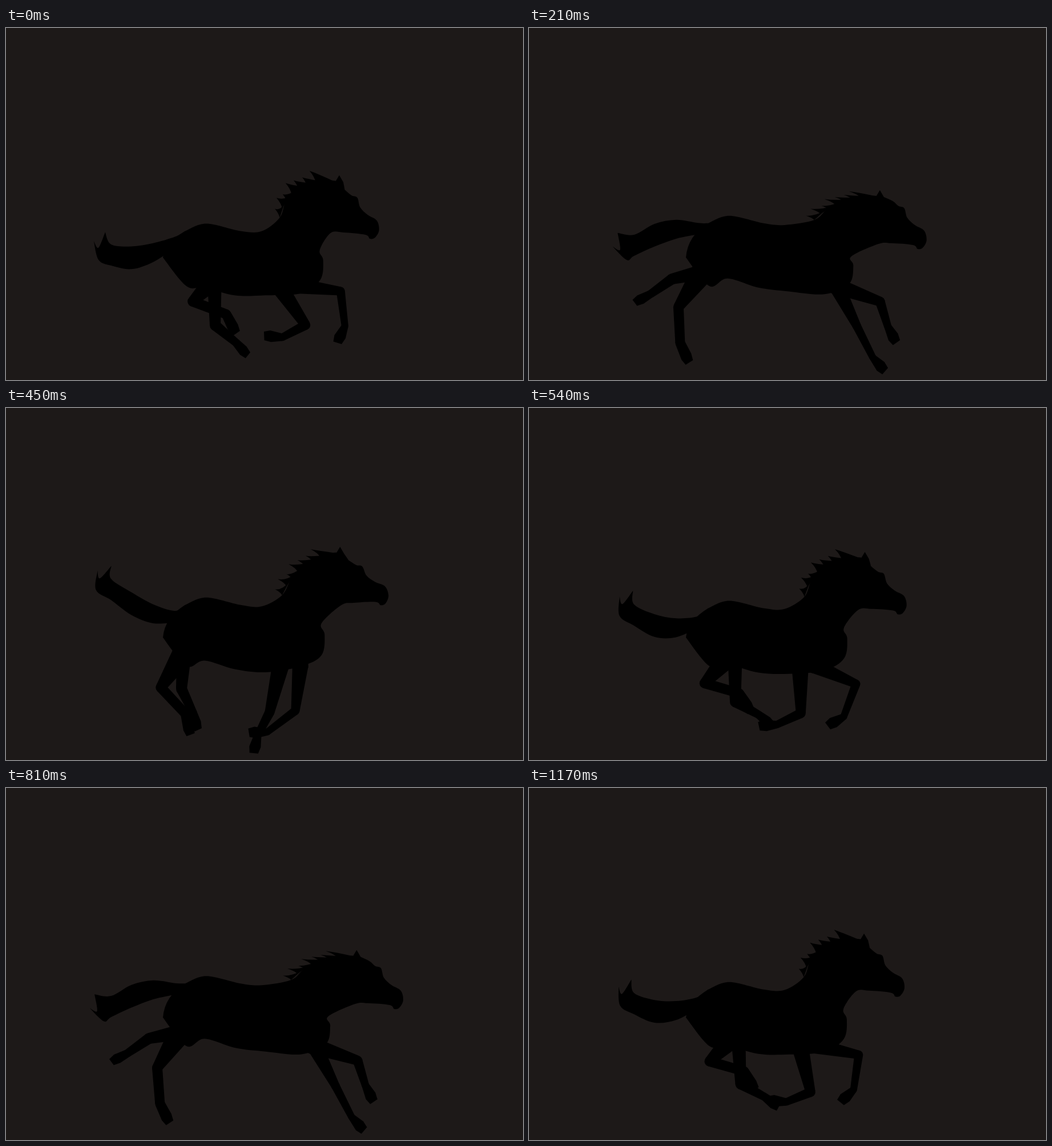
Recreate the animation shown at these times as an HTML page with a canvas. Size 906 by 618 pixels, loop 1.2 s.

```html
<!DOCTYPE html>
<html lang="en">
<head>
<meta charset="utf-8">
<title>Galloping horse</title>
<style>
  html, body { margin: 0; width: 100%; height: 100%; overflow: hidden; background: #1d1918; }
  canvas { display: block; }
</style>
</head>
<body>
<canvas id="stage" width="906" height="618"></canvas>
<script>
const ctx = document.getElementById('stage').getContext('2d');
const { sin, cos, PI, hypot } = Math;
const LOOP = 1200, STEP = 30, STRIDE = 604;

// Stride angle; every moving part is a function of it
let theta = 0;

// Mean plus first and second harmonic of the stride
const wave = (mean, c1 = 0, s1 = 0, c2 = 0, s2 = 0) => () =>
  mean + c1 * cos(theta) + s1 * sin(theta) + c2 * cos(2 * theta) + s2 * sin(2 * theta);

// A bone is a length and an angle in degrees, forward of straight down
const bone = (length, angle) => ({ length, angle });

const legs = [
  { // near fore
    x: wave(500, -17.5, 24, -5, -5), y: 452, widths: [15, 8.5, 6.5, 10],
    bones: [
      bone(wave(84), wave(34.3, 1.3, 49, -1.3, 4)),
      bone(wave(46), wave(-18, -33.5, 21, -10.5, 5)),
      bone(wave(27), wave(-16.7, -67.5, 10, -11, 7))
    ]
  },
  { // far fore
    x: wave(522, -1.5, 20, -13.5, 5.5), y: 452, widths: [14, 7.5, 6, 10],
    bones: [
      bone(wave(80), wave(26.5, 46.8, 21, 9.5, -14)),
      bone(wave(62), wave(-5, 5.5, 41, 6.5, -4)),
      bone(wave(27), wave(-19.7, -10, 64, 4.7, -5))
    ]
  },
  { // near hind
    x: wave(334.7, 45.5, 8, 7, 2.6), y: 420, widths: [22, 9, 8.5, 10],
    bones: [
      bone(wave(85), wave(-39.5, 7.5, 7, -13, 1)),
      bone(wave(63), wave(30, 45, -9, -5.8, -4.3)),
      bone(wave(33), wave(15, 24.5, 13, -12.5, -9))
    ]
  },
  { // far hind
    x: wave(317, 45, 0, 3, -8), y: 430, widths: [13, 9.5, 7, 9],
    bones: [
      bone(wave(64, 28), wave(-26.3, 12.5, -36.7, 14.8, 9.5)),
      bone(wave(47), wave(-.5, 39.7, -38.7, 11, -4)),
      bone(wave(26), wave(-8, 38.8, -37, 11.5, -3))
    ]
  }
];

const brow = { x: wave(633, -17.3, 8.7, 0, -8), y: wave(297.7, -2.5, 16.5, 2.8, -5) };
const headTilt = wave(-.063, .04, .058, .023, -.029);
const rumpDrop = wave(0, 8.5, 2, 0, 2);
const wind = wave(.55, -.5);

// Torso points: x, y, share of the rump drop, share of the head's nod
const back = [
  [314, 348, 1, 0], [351, 335, 1, 0], [411, 348, 1, 0], [448, 350, .8, 0], [488, 333, 0, .22]
];
const belly = [
  [556, 390, 0, .6], [561, 408, 0, .5], [555, 442, 0, .4], [518, 462, .4, .4], [455, 465, .5, 0],
  [402, 461, 1, 0], [348, 446, 1.2, 0], [316, 453, 0, 0], [275, 403, 0, 0]
];

// Profile from behind the ear round the muzzle to the jaw, relative to the brow
const face = [
  [-22, -14], [-10, -4], [0, 0], [5, 17], [18, 30], [34, 40],
  [38, 57], [31, 70], [22, 72], [14, 65], [-24, 61], [-47, 62]
];

// Tail tuft relative to the tail's end: upper tip, notch, lower tip, underside
const tuft = [[-1, -34], [-8, -5], [-18, -15], [-4, 16]];

const lerp = (a, b, u) => a + (b - a) * u;
const rotate = (pts, a, x, y) =>
  pts.map(([px, py]) => [x + px * cos(a) - py * sin(a), y + px * sin(a) + py * cos(a)]);

// Continues the current path along a smooth curve through the points
function curve(pts) {
  ctx.lineTo(...pts[0]);
  for (let i = 0; i < pts.length - 1; i++) {
    const p = pts[i], q = pts[i + 1], o = pts[i - 1] || p, r = pts[i + 2] || q;
    ctx.bezierCurveTo(p[0] + (q[0] - o[0]) / 6, p[1] + (q[1] - o[1]) / 6,
                      q[0] - (r[0] - p[0]) / 6, q[1] - (r[1] - p[1]) / 6, ...q);
  }
}

function polygon(...pts) {
  ctx.beginPath();
  pts.forEach(p => ctx.lineTo(...p));
  ctx.fill();
}

function drawLeg({ x, y, widths, bones }) {
  let p = [x(), y];
  bones.forEach(({ length, angle }, i) => {
    const a = angle() * PI / 180, len = length(), w0 = widths[i], w1 = widths[i + 1];
    const q = [p[0] + len * sin(a), p[1] + len * cos(a)];
    const at = (along, side) => [p[0] + along * sin(a) + side * cos(a), p[1] + along * cos(a) - side * sin(a)];
    ctx.beginPath();
    ctx.arc(...p, w0, 0, 2 * PI);
    ctx.fill();
    if (i < 2) {
      polygon(at(0, w0), at(len, w1), at(len, -w1), at(0, -w0));
    } else {
      polygon(at(0, w0), at(len - 8, w1), at(len + 4, w1 - 2), at(len + 6, 3 - w1), at(len - 5, -w1), at(0, -w0));
    }
    p = q;
  });
}

// A wave that grows and lags from the dock to the tip
function drawTail(dock) {
  const height = s => 363 + 4 * sin(PI * s) + (14 + 48 * s) * cos(theta - (77 * s - 15) * PI / 180);
  const edge = (s, side) => [296 - 127 * s, height(s) + side * (10 + 10 * sin(2.4 * s))];
  const stations = [0, .3, .6, .88];
  const bend = (height(.63) - height(1)) * .015;
  const [upper, notch, lower, under] = rotate(tuft, bend, 169, height(1));
  ctx.beginPath();
  curve([dock, ...stations.map(s => edge(s, -1)), upper]);
  curve([upper, notch, lower]);
  curve([lower, under, ...stations.map(s => edge(s, 1)).reverse()]);
  ctx.fill();
}

function drawMane(crest, gust) {
  const locks = 7;
  for (let i = 0; i < locks; i++) {
    const u = i / locks * .9, size = 1 + .3 * sin(i * 2.4);
    const dx = lerp(-8, -16, gust) * size, dy = lerp(-16, -6, gust) * size;
    const [ax, ay] = crest(u), b = crest(u + .2);
    ctx.beginPath();
    ctx.moveTo(ax, ay);
    ctx.quadraticCurveTo(ax + dx * .2, ay + dy * .5, ax + dx, ay + dy);
    ctx.quadraticCurveTo(ax + dx * .3 + 4, ay + dy * .8, ...b);
    ctx.fill();
  }
}

function drawBody() {
  const x = brow.x(), y = brow.y(), drop = rumpDrop(), gust = wind();
  const follow = ([px, py, rump, nod]) =>
    [px + (x - 633) * nod * (rump ? 0 : 1) * (px < 500 ? 2.2 : .6), py + drop * rump + (y - 298) * nod];
  const spine = back.map(follow), underside = belly.map(follow);
  const profile = rotate(face, headTilt(), x, y);
  const ear = [x + lerp(-31, -45, gust), y + lerp(-40, -30, gust)];
  const poll = [ear[0] - 6, ear[1] + 10];
  const dock = spine[0], withers = spine[4], rump = underside[8];

  const bulge = [lerp(-19, -4, gust), lerp(-18, -10, gust)];
  const crest = u => [0, 1].map(k => lerp(withers[k], poll[k], u) + 4 * u * (1 - u) * bulge[k]);

  drawTail(dock);
  ctx.beginPath();
  curve([...spine, ...[.25, .5, .75, 1].map(crest), ...profile, ...underside]);
  ctx.quadraticCurveTo(rump[0] + 3, dock[1] + 22, ...dock);
  ctx.fill();
  polygon(poll, ear, [ear[0] + 7, ear[1] + 12], profile[0]);
  drawMane(crest, gust);
}

function draw(time) {
  theta = 2 * PI * time / STRIDE;
  ctx.fillStyle = '#1d1918';
  ctx.fillRect(0, 0, 906, 618);
  ctx.fillStyle = '#000';
  legs.forEach(drawLeg);
  drawBody();
}

const start = performance.now();
function tick() {
  const elapsed = (performance.now() - start) % LOOP;
  draw(Math.floor(elapsed / STEP) * STEP);
  requestAnimationFrame(tick);
}
tick();
</script>
</body>
</html>
```
